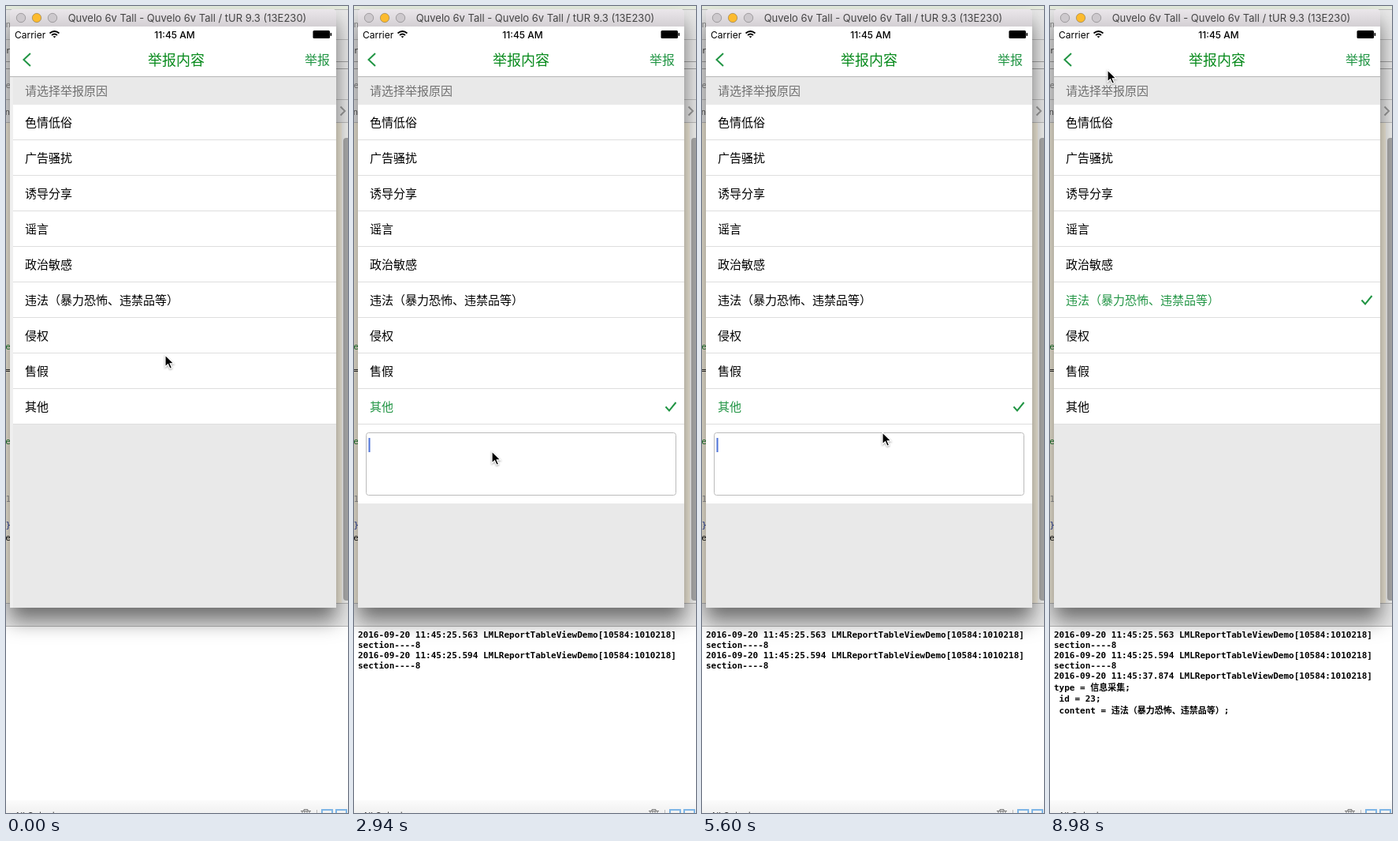
An HTML page for the animation above (9 s loop, 434 by 1022 pixels).

```html
<!DOCTYPE html>
<html lang="zh-CN">
<head>
<meta charset="utf-8">
<style>
html, body { margin: 0; height: 100%; overflow: hidden; background: #fff; }
svg { display: block; }
text { white-space: pre; font: 15px Inter, "Noto Sans CJK SC", sans-serif; }
.mono text { font: bold 11px "DejaVu Sans Mono", "Noto Sans CJK SC", monospace; }
.code text { font: 11px "DejaVu Sans Mono", monospace; text-anchor: end; }
.shadow { filter: drop-shadow(0 16px 13px rgba(0,0,0,.52)); }
.line { fill: none; stroke-width: 2; }
</style>
</head>
<body>
<svg width="434" height="1022" viewBox="0 0 434 1022">
  <defs>
    <clipPath id="screen"><rect x="5" y="26" width="414" height="736"/></clipPath>
    <linearGradient id="bar" x2="0" y2="1"><stop stop-color="#ebe7eb"/><stop offset="1" stop-color="#d3cfd3"/></linearGradient>
    <linearGradient id="foot" x2="0" y2="1"><stop stop-color="#fbfbfb"/><stop offset="1" stop-color="#f1f1f1"/></linearGradient>
  </defs>

  <!-- editor window behind -->
  <rect width="434" height="1022" fill="#fff"/>
  <rect width="434" height="4" fill="#e6eddf"/>
  <rect y="4" width="434" height="143" fill="#e9e9e9"/>
  <path d="M0 4.5H434M0 42.5H434M0 118.5H434M0 147.5H434" stroke="#bcbcbc"/>
  <path d="M0 70.5H434M0 79.5H434" stroke="#a0a0a0"/>
  <rect y="148" width="434" height="608" fill="#f7f0df"/>
  <rect x="426" y="148" width="8" height="608" fill="#f1f1ef"/>
  <rect x="428" y="167" width="10" height="586" rx="4" fill="#a9a9a9"/>
  <rect y="756" width="434" height="30" fill="#e6e6e6"/>
  <path d="M0 756.5H434M0 785.5H434" stroke="#b4b4b4"/>
  <path d="M424.500 127.500L430 133L424.500 138.500" class="line" stroke="#999"/>
  <rect y="1006" width="434" height="16" fill="url(#foot)"/>
  <text x="11" y="1029" style="font-size:11px" fill="#333">All Output ≎</text>
  <path d="M374 1019.500H387M378 1019V1017.500H383V1019M376 1020V1022M379 1020V1022M382 1020V1022M385 1020V1022" fill="none" stroke="#777"/>
  <path d="M394.500 1018V1022" stroke="#bbb"/>
  <path d="M401 1022V1018H414V1022M419 1022V1018H432V1022" class="line" stroke="#7db5e6"/>
  <g class="code">
    <text x="6" y="27" fill="#888">n</text><text x="6" y="60" fill="#444">r</text>
    <text x="6" y="104" fill="#888">e</text><text x="5" y="138" fill="#555">n</text>
    <text x="6" y="435" fill="#1c7a2c">le</text><text x="6" y="465" fill="#111">=</text>
    <text x="6" y="555" fill="#1c7a2c">te</text><text x="6" y="628" fill="#999">1</text>
    <text x="6" y="661" fill="#223a9c">}</text><text x="6" y="677" fill="#111">re</text>
  </g>

  <!-- simulator window -->
  <path class="shadow" d="M5 762V9Q5 4 10 4H414Q419 4 419 9V762Z" fill="#e9e9e9"/>
  <path d="M5 26V9Q5 4 10 4H414Q419 4 419 9V26Z" fill="url(#bar)"/>
  <g stroke-opacity=".25" stroke="#000">
    <circle cx="19" cy="15" r="5.700" fill="#cdc9cd"/>
    <circle cx="39" cy="15" r="5.700" fill="#fcbb2f"/>
    <circle cx="59" cy="15" r="5.700" fill="#cdc9cd"/>
  </g>
  <text x="230" y="20" text-anchor="middle" style="font-size:13px" fill="#444">Quvelo 6v Tall - Quvelo 6v Tall / tUR 9.3 (13E230)</text>

  <g clip-path="url(#screen)">
    <rect x="5" y="26" width="414" height="64" fill="#fff"/>
    <rect x="5" y="90" width="414" height="672" fill="#efefef"/>
    <path d="M5 89.500H419" stroke="#b5b5b5"/>
    <g id="page">
      <rect x="5" y="90" width="414" height="672" fill="#e9e9e9"/>
      <path d="M27 60L18.500 68L27 76" class="line" stroke="#219544"/>
      <text x="212" y="75" text-anchor="middle" style="font-size:18px" fill="#078a1c">举报内容</text>
      <text x="375" y="74" style="font-size:16px" fill="#219544">举报</text>
      <text x="20" y="113" fill="#707070">请选择举报原因</text>
      <g id="rows"></g>
      <g id="entry">
        <rect x="5" y="530" width="414" height="100" fill="#fff"/>
        <rect x="15.500" y="540.500" width="393" height="79" rx="3" fill="#fff" stroke="#bbb"/>
        <text id="hint" x="20" y="561" style="font-size:14px" fill="#c8c8c8">请输入您的举报内容</text>
        <text id="typed" x="20" y="561" style="font-size:13.500px" fill="#000"></text>
        <rect id="caret" y="547" width="2" height="18" fill="#4d72d8"/>
      </g>
      <path id="tick" d="M395.500 147.500L400 152.500L408.500 142" class="line" stroke="#219544"/>
    </g>
    <text x="11" y="41" style="font-size:12px">Carrier</text>
    <g class="line" stroke="#000" style="stroke-width:1.700">
      <path d="M55.500 34.500Q61.500 29.500 67.500 34.500M58 37Q61.500 34 65 37"/>
      <path d="M59.500 38.200H63.500L61.500 40.500Z" fill="#000" stroke="none"/>
    </g>
    <text x="214" y="41" text-anchor="middle" style="font-size:12px;font-weight:500">11:45 AM</text>
    <rect x="389.500" y="31" width="21.500" height="10" rx="1.500"/>
    <rect x="411.500" y="34" width="1.700" height="4" rx=".8"/>
  </g>

  <g id="log" class="mono"></g>
  <path id="mouse" d="M0 0V15L3.500 11.700L6 17.300L8.600 16.200L6.200 10.800H11Z" stroke="#fff" stroke-width="1.200" style="filter:drop-shadow(0 1px 1px rgba(0,0,0,.35))"/>
</svg>
<script>
const $ = id => document.getElementById(id);
const LOOP = 9000, OTHER = 1050, FOCUS = 2700, ILLEGAL = 6300, SUBMIT = 7200;
const GREEN = '#219544', MESSAGE = 'I wanna';
const reasons = ['色情低俗', '广告骚扰', '诱导分享', '谣言', '政治敏感',
  '违法（暴力恐怖、违禁品等）', '侵权', '售假', '其他'];

$('rows').innerHTML = reasons.map((r, i) => {
  const y = 125 + i * 45;
  return `<rect x="5" y="${y}" width="414" height="45" fill="#fff"/>
    <path d="M5 ${y + 44.5}H419" stroke="#dedede"/>
    <text x="20" y="${y + 28}">${r}</text>`;
}).join('');
const labels = $('rows').querySelectorAll('text');

const app = 'LMLReportTableViewDemo[10584:1010218]';
// [time shown, baseline, text]
const log = [
  [OTHER, 800, '2016-09-20 11:45:25.563 ' + app],
  [OTHER, 813, 'section----8'],
  [OTHER + 20, 826, '2016-09-20 11:45:25.594 ' + app],
  [OTHER + 20, 839, 'section----8'],
  [SUBMIT, 852, '2016-09-20 11:45:37.874 ' + app],
  [SUBMIT, 867, 'type = 信息采集;'],
  [SUBMIT, 881, ' id = 23;'],
  [SUBMIT, 896, ' content = 违法（暴力恐怖、违禁品等）;']
];
$('log').innerHTML = log.map(l => `<text x="5" y="${l[1]}">${l[2]}</text>`).join('');
const lines = [...$('log').children];

// pointer stops: [time, x, y]
const stops = [
  [0, 202, 442], [400, 240, 150], [520, 240, 150], [780, 238, 192],
  [1030, 205, 502], [2250, 205, 502], [2650, 175, 564], [4900, 175, 564],
  [5450, 229, 540], [5800, 229, 540], [6250, 225, 370], [6500, 225, 370],
  [7050, 392, 68], [7220, 392, 68], [7560, 64, 868], [8150, 64, 868],
  [8900, 73, 81], [9000, 73, 81]
];
const clamp = v => Math.max(0, Math.min(1, v));

function pointer(t) {
  const i = stops.findIndex(s => s[0] > t), a = stops[i - 1], b = stops[i];
  const k = (t - a[0]) / (b[0] - a[0]), e = k * k * (3 - 2 * k);
  return [a[1] + (b[1] - a[1]) * e, a[2] + (b[2] - a[2]) * e];
}

function draw(t) {
  const slide = t < 140 ? 4 * (1 - t / 140) ** 2 : 0;
  $('page').setAttribute('transform', `translate(${slide})`);

  const chosen = t < 450 ? -1 : t < OTHER ? 0 : t < ILLEGAL ? 8 : 5;
  labels.forEach((l, i) => l.setAttribute('fill', i === chosen ? GREEN : '#000'));
  $('tick').setAttribute('transform', `translate(0 ${chosen * 45})`);
  $('tick').style.display = chosen < 0 ? 'none' : '';

  $('entry').style.opacity = t < ILLEGAL ? clamp((t - OTHER) / 120) : 0;
  const focused = t >= FOCUS;
  $('hint').style.display = focused ? 'none' : '';
  const count = Math.round(MESSAGE.length * (clamp((t - 3250) / 830) - clamp((t - 4600) / 550)));
  $('typed').textContent = MESSAGE.slice(0, count);
  const width = count ? $('typed').getComputedTextLength() : -2;
  $('caret').setAttribute('x', 20.5 + width);
  const idle = t < 3250 || t > 5200;
  $('caret').style.display = focused && (!idle || Math.floor((t + 100) / 250) % 2 === 0) ? '' : 'none';

  lines.forEach((l, i) => l.style.display = t >= log[i][0] ? '' : 'none');
  $('mouse').setAttribute('transform', `translate(${pointer(t)})`);
}

function frame() {
  draw(performance.now() % LOOP);
  requestAnimationFrame(frame);
}
frame();
</script>
</body>
</html>
```
